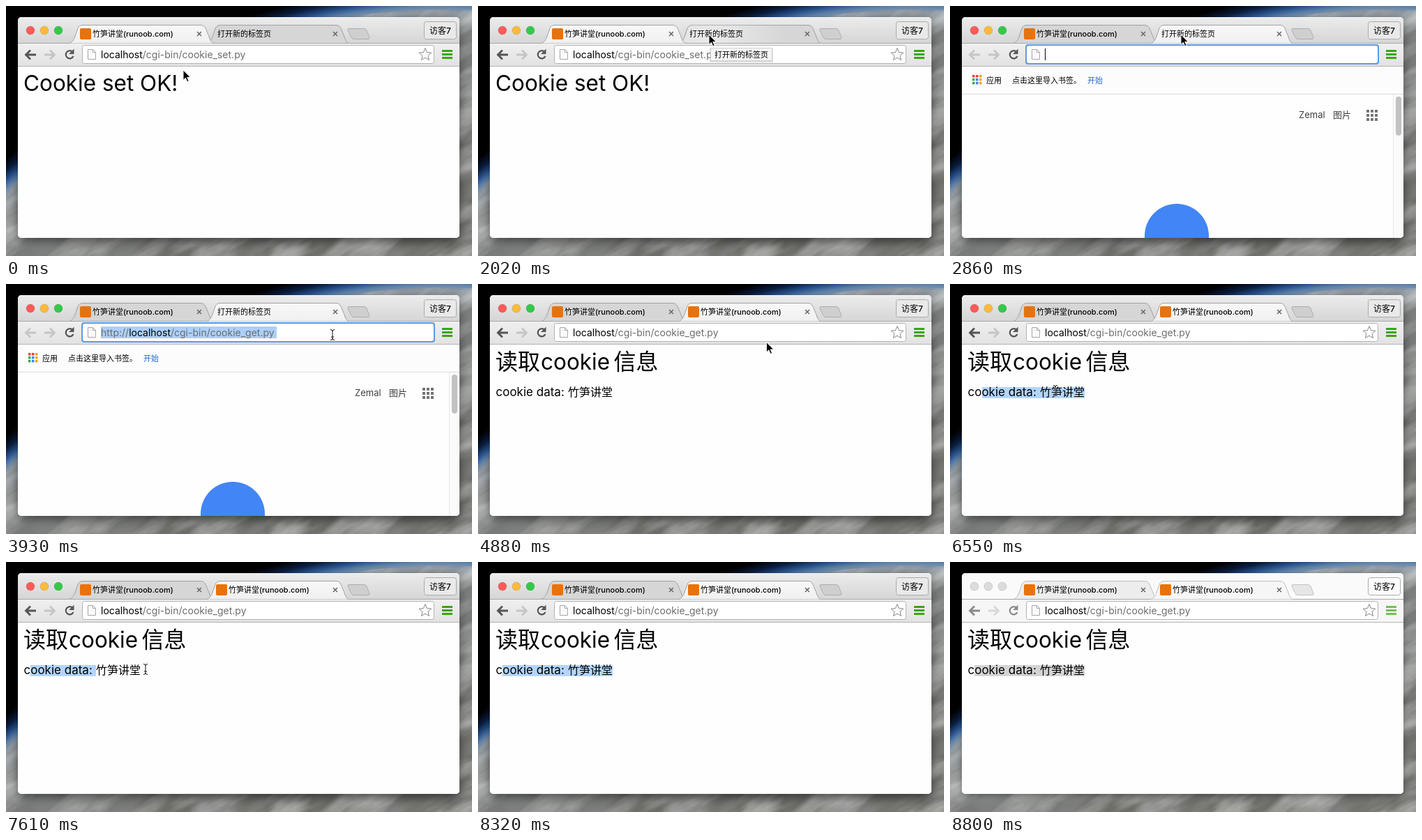
An HTML page that plays this animation: 668x359 px, repeating every 8900 ms.

```html
<!DOCTYPE html>
<html lang="zh">
<head>
<meta charset="utf-8">
<title>Cookie</title>
<style>
  html, body { margin: 0; width: 100%; height: 100%; overflow: hidden; background: #000; }
  svg { position: absolute; left: 0; top: 0; will-change: transform; }
  text { font: 500 11px Inter, 'Noto Sans CJK SC', 'Noto Sans CJK', sans-serif; fill: #000; white-space: pre; }
  .url { font-size: 14px; font-weight: 400; fill: #6d6d6d; }
  .url tspan { fill: #000; }
  .h1 { font-size: 31.5px; font-weight: 400; }
  .h1 .zh { font-size: 32px; font-weight: 500; }
  .p { font-size: 17px; font-weight: 400; }
  .p .zh { font-size: 16px; }
  .link { font-size: 13px; font-weight: 400; fill: #404040; }
  .frame { filter: drop-shadow(0 5px 7px rgba(0,0,0,.5)); }
  .tab path { fill: #d6d6d6; stroke: #a2a2a2; }
  .tab.on path { fill: url(#active); }
  .tab .x { fill: none; stroke: #6b6b6b; stroke-width: 1.6; }
  .bar { fill: url(#bar); }
  .tools { fill: url(#tools); }
  .lights { stroke: rgba(0,0,0,.12); }
  .tint { fill: #3aa60f; }
  .dark { stroke: #555; }
  .pale { stroke: #c6c6c6; }
  .plus { fill: #cfcfcf; stroke: #adadad; }
  .user { fill: #e9e9e9; stroke: #ababab; }
  .idle .bar { fill: #fafafa; }
  .idle .tools, .idle .tab.on path:not(.x) { fill: #f6f6f6; }
  .idle .tab path:not(.x) { fill: #ededed; stroke: #bdbdbd; }
  .idle .lights circle { fill: #dcdcdc; }
  .idle .tint { fill: #72c24f; }
  .idle .dark { stroke: #8a8a8a; }
  .idle .pale { stroke: #d8d8d8; }
  .idle .plus { fill: #e6e6e6; stroke: #c4c4c4; }
  .idle .user { fill: #fcfcfc; }
  .idle.frame { filter: drop-shadow(0 2px 4px rgba(0,0,0,.35)); }
</style>
</head>
<body>
<svg width="668" height="359">
  <defs>
    <radialGradient id="earth" gradientUnits="userSpaceOnUse" cx="626" cy="883" r="912">
      <stop offset=".7" stop-color="#6c6d68"/>
      <stop offset=".93" stop-color="#7c7f7e"/>
      <stop offset=".958" stop-color="#929ca5"/>
      <stop offset=".967" stop-color="#5f84ad"/>
      <stop offset=".976" stop-color="#27508a"/>
      <stop offset=".986" stop-color="#0b1d3e"/>
      <stop offset="1" stop-color="#000"/>
    </radialGradient>
    <filter id="clouds" x="0" y="0" width="1" height="1">
      <feTurbulence type="fractalNoise" baseFrequency=".009 .03" numOctaves="4" seed="8"/>
      <feColorMatrix values="0 0 0 0 .78  0 0 0 0 .79  0 0 0 0 .78  2.4 0 0 0 -.95"/>
    </filter>
    <filter id="land" x="0" y="0" width="1" height="1">
      <feTurbulence type="fractalNoise" baseFrequency=".011 .03" numOctaves="3" seed="3"/>
      <feColorMatrix values="0 0 0 0 .3  0 0 0 0 .31  0 0 0 0 .31  0 2 0 0 -.85"/>
    </filter>
    <clipPath id="globe"><circle cx="626" cy="883" r="878"/></clipPath>
  </defs>
  <rect width="668" height="359" fill="url(#earth)"/>
  <g clip-path="url(#globe)">
    <g transform="rotate(-30 334 180)">
      <rect x="-100" y="-250" width="870" height="860" filter="url(#land)" opacity=".7"/>
      <rect x="-100" y="-250" width="870" height="860" filter="url(#clouds)" opacity=".6"/>
    </g>
  </g>
  <rect id="frame" class="frame" x="17" y="16" width="633" height="317" rx="5" fill="#eee"/>
</svg>

<svg id="ui" width="668" height="359">
  <defs>
    <linearGradient id="bar" x2="0" y2="1"><stop stop-color="#ececec"/><stop offset="1" stop-color="#d5d5d5"/></linearGradient>
    <linearGradient id="active" x2="0" y2="1"><stop stop-color="#f8f8f8"/><stop offset="1" stop-color="#f0f0f0"/></linearGradient>
    <linearGradient id="tools" x2="0" y2="1"><stop stop-color="#f0f0f0"/><stop offset="1" stop-color="#e2e2e2"/></linearGradient>
    <radialGradient id="glow"><stop stop-color="#fff" stop-opacity=".55"/><stop offset="1" stop-color="#fff" stop-opacity="0"/></radialGradient>
    <clipPath id="win"><rect x="17" y="16" width="633" height="317" rx="5"/></clipPath>
    <clipPath id="tabClip"><path d="M289 53Q294 52 297 44L301 32Q303 27.500 308 27.500H473Q478 27.500 480 32L484 44Q486 52 490 53Z"/></clipPath>
  </defs>

  <g clip-path="url(#win)">
    <rect class="bar" x="17" y="16" width="633" height="38"/>
    <path d="M20 16.500H647" stroke="#fff" opacity=".7"/>
    <g class="lights">
      <circle cx="35" cy="35" r="6" fill="#fc5b57"/>
      <circle cx="55" cy="35" r="6" fill="#fdbb3c"/>
      <circle cx="75" cy="35" r="6" fill="#34c84a"/>
    </g>
    <path class="plus" d="M492 32.500H513Q516 32.500 517 35L521 45Q522 47.500 519 47.500H499Q496 47.500 495 45L490 35Q489 32.500 492 32.500Z"/>
    <rect class="user" x="599.5" y="22.500" width="46" height="25" rx="3"/>
    <text x="607" y="39.500" style="font-size:12px">访客7</text>

    <rect class="tools" x="17" y="53" width="633" height="34"/>
    <g id="strip">
      <g class="tab">
        <path d="M91 53.500Q96 52 99 44L103 32Q105 27.500 110 27.500H279Q284 27.500 286 32L291 44Q293 52 298 53.500"/>
        <rect x="106" y="32" width="16" height="16" rx="2" fill="#e8720c"/>
        <text x="124" y="44">竹笋讲堂(runoob.com)</text>
        <path class="x" d="m274 37 6 6m0-6-6 6"/>
      </g>
      <g class="tab">
        <path d="M288 53.500Q293 52 296 44L300 32Q302 27.500 307 27.500H473Q478 27.500 480 32L485 44Q487 52 491 53.500"/>
        <ellipse id="hover" rx="111" ry="45" fill="url(#glow)" clip-path="url(#tabClip)"/>
        <text id="blankTitle" x="303" y="44">打开新的标签页</text>
        <g id="pageTitle">
          <rect x="301" y="32" width="16" height="16" rx="2" fill="#e8720c"/>
          <text x="319" y="44">竹笋讲堂(runoob.com)</text>
        </g>
        <path class="x" d="m469 37 6 6m0-6-6 6"/>
      </g>
      <path id="rule" d="M17 53.500H650" stroke="#a8a8a8"/>
    </g>

    <g fill="none" stroke-width="2.800">
      <path id="back" class="dark" d="M43 70H29M35 63.500 28.500 70 35 76.500"/>
      <path class="pale" d="M55 70H69M63 63.500 69.500 70 63 76.500"/>
      <path class="dark" stroke-width="2.200" d="M95.500 66A5.600 5.600 0 1 0 96.500 72"/>
      <path class="dark" stroke-width="2" d="M96.500 64V68H92.500Z"/>
    </g>
    <rect x="109.500" y="56.500" width="504" height="26" rx="3" fill="#fff" stroke="#b3b3b3"/>
    <rect id="focus" x="109" y="56" width="505" height="27" rx="3" fill="none" stroke="#5a9ae6" stroke-width="2"/>
    <path d="M117.500 62.500H124.500L128.500 66.500V76.500H117.500ZM124.500 62.500V66.500H128.500" fill="#fafafa" stroke="#a6a6a6"/>
    <path id="star" d="M601 60.500 603.600 66.600 609.800 67.100 605 71.300 606.500 77.500 601 74.200 595.500 77.500 597 71.300 592.200 67.100 598.400 66.600Z" fill="#fff" stroke="#858585"/>
    <path class="tint" d="M625 63h15v3h-15zM625 68h15v3h-15zM625 73h15v3h-15z"/>

    <text id="urlSet" class="url" x="136" y="74.500"><tspan>localhost</tspan>/cgi-bin/cookie_set.py</text>
    <text id="urlGet" class="url" x="136" y="74.500"><tspan>localhost</tspan>/cgi-bin/cookie_get.py</text>
    <g id="urlTyped">
      <rect id="urlMark" x="136" y="61" width="252" height="17" fill="#abd0fa"/>
      <text class="url" x="136" y="74.500">http://<tspan>localhost</tspan>/cgi-bin/cookie_get.py</text>
    </g>
    <rect id="caret" y="61" width="1" height="17"/>

    <rect x="17" y="86" width="633" height="1" fill="#b4b4b4"/>
    <rect x="17" y="87" width="633" height="246" fill="#fefefe"/>

    <text id="pageSet" class="h1" x="25" y="121.500">Cookie set OK!</text>

    <g id="pageBlank">
      <rect x="17" y="87" width="633" height="39" fill="#fcfcfc"/>
      <rect x="17" y="126" width="633" height="1" fill="#dcdcdc"/>
      <g id="apps"></g>
      <text x="52" y="111">应用</text>
      <text x="89" y="111">点击这里导入书签。</text>
      <text x="197" y="111" style="fill:#2268d8">开始</text>
      <text class="link" x="500" y="161">Zemal</text>
      <text class="link" x="549" y="161">图片</text>
      <g id="grid"></g>
      <rect x="635" y="127" width="15" height="206" fill="#fafafa"/>
      <rect x="635" y="127" width="1" height="206" fill="#e7e7e7"/>
      <rect x="639" y="130" width="8" height="56" rx="4" fill="#c2c2c2"/>
      <circle cx="325" cy="330" r="46" fill="#4285f4"/>
    </g>

    <g id="pageGet">
      <text class="h1" y="122.500"><tspan class="zh" x="25">读取</tspan><tspan x="90">cookie</tspan><tspan class="zh" x="194.500">信息</tspan></text>
      <rect id="mark" y="148" height="16"/>
      <text class="p" y="161"><tspan x="25.500">cookie data:</tspan><tspan class="zh" x="129">竹笋讲堂</tspan></text>
    </g>
  </g>

  <g id="tip">
    <rect x="332" y="61" width="91" height="20" fill="#000" opacity=".13"/>
    <rect x="333.500" y="60.500" width="88" height="18" fill="#f5f5f5" stroke="#d0d0d0"/>
    <text x="339" y="73.500">打开新的标签页</text>
  </g>

  <g id="cursor">
    <path id="arrow" d="M0 0V14.500L3.400 11.300 5.800 16.800 8.100 15.800 5.800 10.500H10.400Z" stroke="#fff"/>
    <g id="beam" fill="none">
      <path d="M-3-7.500Q0-7.500 0-5V5Q0 7.500-3 7.500M3-7.500Q0-7.500 0-5M0 5Q0 7.500 3 7.500M-2 3H2" stroke="#fff" stroke-width="2.500" opacity=".6"/>
      <path d="M-3-7.500Q0-7.500 0-5V5Q0 7.500-3 7.500M3-7.500Q0-7.500 0-5M0 5Q0 7.500 3 7.500M-2 3H2" stroke="#111"/>
    </g>
  </g>
</svg>

<script>
const LOOP = 8900;
const $ = id => document.getElementById(id);
const tabs = [...document.querySelectorAll('.tab')];

// Pointer hops: first hop, last hop, hop count, end x, end y, shape
const HOPS = [
  [120, 710, 6, 331, 41, 'arrow'],
  [2980, 3700, 7, 490, 92, 'arrow'],
  [3810, 3930, 2, 468, 73, 'beam'],
  [4880, 5240, 4, 250, 115, 'arrow'],
  [5360, 5360, 1, 195, 121, 'beam'],
  [5480, 5830, 4, 46, 154, 'beam'],
  [5950, 6430, 5, 190, 155, 'beam'],
  [6550, 6550, 1, 151, 153, 'beam'],
  [6670, 6670, 1, 162, 153, 'beam'],
  [6780, 6780, 1, 108, 152, 'beam'],
  [7020, 7370, 4, 32, 154, 'beam'],
  [7610, 7610, 1, 200, 154, 'beam'],
  [7730, 8200, 5, 554, 345, 'arrow']
];

// Text selection: time, left, right
const MARKS = [
  [0, 0, 0], [6070, 46, 94], [6190, 46, 129], [6310, 46, 161], [6430, 46, 193],
  [7370, 0, 0], [7610, 35, 129], [7730, 35, 193]
];

function pointer(t) {
  let x = 254, y = 92, shape = 'arrow';
  for (const [from, to, n, ex, ey, kind] of HOPS) {
    if (t < from) break;
    const hop = n === 1 ? 1 : Math.min(n, 1 + Math.floor((t - from) / (to - from) * (n - 1) + .02));
    x += (ex - x) * hop / n;
    y += (ey - y) * hop / n;
    shape = kind;
    if (hop < n) break;
  }
  return { x, y, shape };
}

function squares(id, x, y, gap, size, colours) {
  $(id).innerHTML = Array.from({ length: 9 }, (_, i) =>
    `<rect x="${x + i % 3 * gap}" y="${y + Math.floor(i / 3) * gap}" width="${size}" height="${size}" fill="${colours[i % colours.length]}"/>`
  ).join('');
}
squares('apps', 32, 99, 5, 3.5, ['#e5453a', '#e5453a', '#f2a321', '#35a853', '#4285f4', '#f2a321', '#35a853', '#4285f4', '#f2a321']);
squares('grid', 597, 149, 6, 4, ['#757575']);

const show = (id, on) => { $(id).style.display = on ? '' : 'none'; };
const set = (id, attrs) => { for (const k in attrs) $(id).setAttribute(k, attrs[k]); };

let activeTab = -1;
function selectTab(i) {
  if (i === activeTab) return;
  activeTab = i;
  tabs.forEach((tab, n) => tab.classList.toggle('on', n === i));
  $('strip').append($('rule'), tabs[i]);
}

function render(t) {
  const first = t < 2860, loaded = t >= 4880, blank = !first && !loaded;
  const idle = t >= 8800;
  selectTab(first ? 0 : 1);
  $('ui').classList.toggle('idle', idle);
  $('frame').classList.toggle('idle', idle);

  show('pageSet', first);
  show('pageBlank', blank);
  show('pageGet', loaded);
  show('blankTitle', !loaded);
  show('pageTitle', loaded);
  show('star', !blank);
  show('focus', blank);
  show('urlSet', first);
  show('urlGet', loaded);
  show('urlTyped', blank && t >= 3930);
  show('urlMark', t < 4050);
  show('tip', t >= 2020 && t < 2620);
  set('back', { class: blank ? 'pale' : 'dark' });

  show('caret', blank && (t < 3810 || t >= 4050 && t < 4650));
  set('caret', { x: t < 3810 ? 136 : 387 });

  const [, left, right] = MARKS.findLast(m => t >= m[0]);
  set('mark', { x: left, width: right - left, fill: idle ? '#d4d4d4' : '#b2d5fe' });

  const { x, y, shape } = pointer(t);
  show('hover', first && y < 53);
  set('hover', { cx: x, cy: y });
  show('cursor', t < 8320);
  show('arrow', shape === 'arrow');
  show('beam', shape === 'beam');
  set('cursor', { transform: `translate(${x.toFixed(1)} ${y.toFixed(1)})` });
}

const start = performance.now();
function tick() {
  render((performance.now() - start) % LOOP);
  requestAnimationFrame(tick);
}
tick();
</script>
</body>
</html>
```
